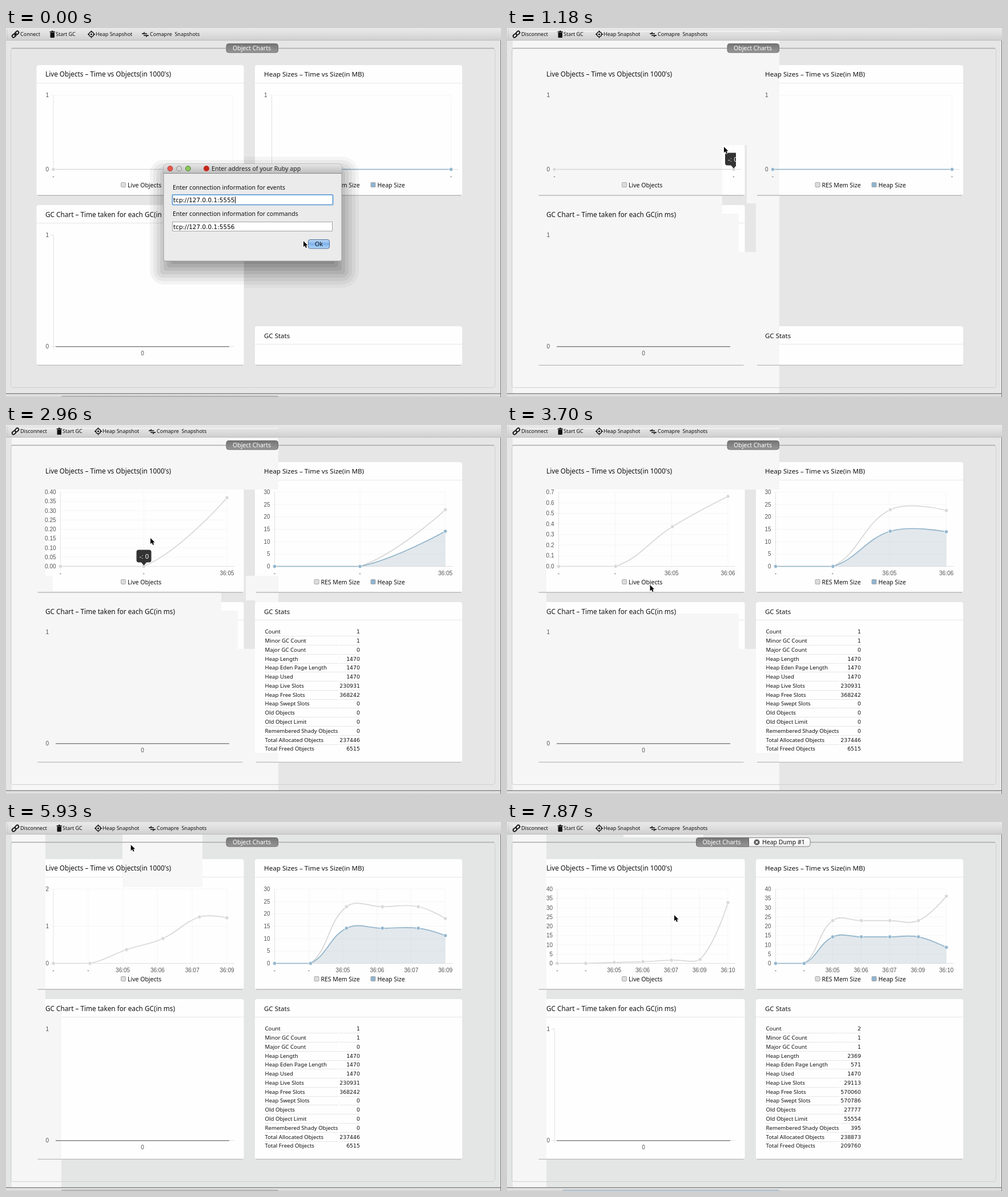
An HTML page with a canvas that plays this animation: 867x646 px, repeating every 8 s.

```html
<!DOCTYPE html>
<html lang="en">
<head>
<meta charset="utf-8">
<title>Object Charts</title>
<style>
html, body { margin: 0; width: 100%; height: 100%; overflow: hidden; background: #e6e6e6; }
canvas { display: block; }
</style>
</head>
<body>
<canvas id="stage" width="867" height="646"></canvas>
<script>
const g = document.getElementById('stage').getContext('2d');
const LOOP = 8000, BASE = 247.5, TOP = 117.5, RIGHT = 382.5;
const UI = '"Noto Sans", "Open Sans", sans-serif';
const WIDE = '"DejaVu Sans", sans-serif';
const AXIS = '"Liberation Sans", Arial, sans-serif';

// The screen refreshes in bursts: start time and number of refreshes.
const TICK = 146.6;
const BURSTS = [[0, 9], [1630, 1], [2080, 7], [3410, 3], [4450, 7], [5640, 6], [7420, 1], [7870, 1]];
const CONNECTED = 870, STATS_IN = 1630, DUMPING = 7420, DUMPED = 7870;

const CURSOR = [[0, 521, 373], [300, 541, 375], [730, 541, 375], [1170, 380, 208], [2080, 380, 208],
  [2960, 253, 198], [3700, 250, 300], [4890, 240, 16], [5640, 200, 9], [6370, 293, 163]];

// Points after the first two arrive at these times.
const ARRIVALS = [2000, 3100, 4380, 5560, 7430];
const LABELS = ['-', '-', '36:05', '36:06', '36:07', '36:09', '36:10'];
const LIVE = [0, 0, .37, .67, 1.25, 1.55, 33.4];
const RES = [0, 0, 22.9, 22.9, 22.9, 22.9, 36.9];
const HEAP = [0, 0, 14.2, 14.2, 14.2, 14.2, 8.8];

// Partial refreshes that wipe the pale wash: time, then x, y, width, height.
const WIPES = [[1020, 377, 205, 43, 120], [1020, 406, 307, 30, 85], [1630, 436, 310, 363, 264],
  [2080, 69, 113, 714, 151], [2080, 82, 264, 338, 26], [3410, 69, 113, 713, 217],
  [4450, 69, 6, 713, 257], [5640, 97, 1, 684, 645], [7870, 69, 27, 712, 619]];

const STATS = [['Count', 1, 2], ['Minor GC Count', 1, 1], ['Major GC Count', 0, 1],
  ['Heap Length', 1470, 2369], ['Heap Eden Page Length', 1470, 571], ['Heap Used', 1470, 1470],
  ['Heap Live Slots', 230931, 29113], ['Heap Free Slots', 368242, 570060],
  ['Heap Swept Slots', 0, 570786], ['Old Objects', 0, 27777], ['Old Object Limit', 0, 55554],
  ['Remembered Shady Objects', 0, 395], ['Total Allocated Objects', 237446, 238873],
  ['Total Freed Objects', 6515, 209760]];

const lerp = (a, b, p) => a + (b - a) * p;

function rect(x, y, w, h, fill) { g.fillStyle = fill; g.fillRect(x, y, w, h); }

function box(x, y, w, h, r, fill, stroke, lw = 1) {
  g.beginPath();
  g.roundRect(x, y, w, h, r);
  if (fill) { g.fillStyle = fill; g.fill(); }
  if (stroke) { g.strokeStyle = stroke; g.lineWidth = lw; g.stroke(); }
}

function dot(x, y, r, fill, stroke, lw = 1) {
  box(x - r, y - r, 2 * r, 2 * r, r, fill, stroke, lw);
}

function line(x1, y1, x2, y2, color, lw = 1) {
  g.beginPath();
  g.moveTo(x1, y1);
  g.lineTo(x2, y2);
  g.strokeStyle = color;
  g.lineWidth = lw;
  g.stroke();
}

function text(s, x, y, size, color = '#111', align = 'left', font = UI) {
  g.font = size + 'px ' + font;
  g.textAlign = align;
  g.fillStyle = color;
  g.fillText(s, x, y);
}

const tickLabel = (s, x, y, align) => text(s, x, y, 10, '#555', align, AXIS);

function shade(y, h, ...colors) {
  const s = g.createLinearGradient(0, y, 0, y + h);
  colors.forEach((c, i) => s.addColorStop(i / (colors.length - 1), c));
  return s;
}

function panel(x, y, h) {
  box(x, y, 363, h, 4, '#fefefe');
  line(x, y + 31.5, x + 363, y + 31.5, '#e6e6e6');
}

// Axis with rounded limits, halving the step while the labels still fit.
function makeAxis(data, n, dx) {
  const top = Math.max(...data.slice(0, n)) || 1;
  const order = Math.floor(Math.log10(top));
  let step = 10 ** order, count = Math.ceil(top / step - 1e-9);
  const max = count * step;
  while (count * 2 <= 8 && (order < 0 || step % 2 === 0)) { step /= 2; count *= 2; }
  const digits = step >= 1 ? 0 : (step * 10 % 1 > .01 && step < .1 ? 2 : 1);
  g.font = '10px ' + AXIS;
  const x0 = dx + 78 + .9 * g.measureText(max.toFixed(digits)).width;
  const x1 = dx + (n > 2 ? 387 : 397);
  return {
    n, x0, x1, step, count, digits,
    x: i => lerp(x0, x1, i / (n - 1)),
    y: v => lerp(BASE, TOP, v / max)
  };
}

function grid(a) {
  for (let k = 0; k <= a.count; k++) {
    const y = a.y(k * a.step);
    line(a.x0 - 5, y, k ? a.x1 : a.x1 + 13, y, k ? '#f5f5f5' : '#e0e0e0');
  }
  for (let i = 0; i < a.n; i++) line(a.x(i), TOP, a.x(i), BASE + 4, i ? '#f5f5f5' : '#e2e2e2');
}

function axisLabels(a) {
  for (let k = 0; k <= a.count; k++) {
    const v = k * a.step;
    tickLabel(v.toFixed(a.digits), a.x0 - 8, a.y(v) + 3.5, 'right');
  }
  for (let i = 0; i < a.n; i++) tickLabel(LABELS[i], a.x(i), 263, 'center');
}

// Points glide from the previous axis to the new one.
function place(t, data, now, old) {
  const p = Math.min(1, (t - ARRIVALS[now.n - 3]) / 700), ease = 1 - (1 - p) ** 4;
  return data.slice(0, now.n).map((v, i) => {
    const x = now.x(i), y = now.y(v);
    if (now.n === 2) return { x, y };
    const known = i < old.n;
    return {
      x: lerp(known ? old.x(i) : x, x, ease),
      y: lerp(known ? old.y(v) : BASE, y, ease)
    };
  });
}

function curve(pts, color, fill) {
  const clampY = y => Math.max(TOP, Math.min(BASE, y));
  const ctl = pts.map((p, i) => {
    const a = pts[i - 1], b = pts[i + 1];
    if (!a || !b) return [p, p];
    const d1 = Math.hypot(p.x - a.x, p.y - a.y), d2 = Math.hypot(b.x - p.x, b.y - p.y);
    return [-d1, d2].map(d => {
      const k = .4 * d / (d1 + d2);
      return { x: p.x + k * (b.x - a.x), y: clampY(p.y + k * (b.y - a.y)) };
    });
  });
  g.beginPath();
  g.moveTo(pts[0].x, pts[0].y);
  for (let i = 1; i < pts.length; i++) {
    const c = ctl[i - 1][1], d = ctl[i][0];
    g.bezierCurveTo(c.x, c.y, d.x, d.y, pts[i].x, pts[i].y);
  }
  g.strokeStyle = color;
  g.lineWidth = 1.7;
  g.stroke();
  if (fill) {
    g.lineTo(pts[pts.length - 1].x, BASE);
    g.lineTo(pts[0].x, BASE);
    g.fillStyle = fill;
    g.fill();
  }
  for (const p of pts) dot(p.x, p.y, 3.2, color, '#fff', .8);
}

function legend(x, label, fill) {
  box(x + .5, 270.5, 8, 8, 1, fill, '#a8a8a8');
  text(label, x + 12, 278.5, 10.5);
}

function tooltip(x, tip) {
  g.save();
  g.beginPath();
  g.rect(60, 110, 341, 150);
  g.clip();
  box(x, 218.5, 26, 22, 4, '#333');
  g.beginPath();
  g.moveTo(tip - 5, 240);
  g.lineTo(tip + 5, 240);
  g.lineTo(tip, 246);
  g.fill();
  text('-: 0', x + 5, 234, 11.5, '#fff', 'left', AXIS);
  g.restore();
}

function wash(t) {
  if (t < CONNECTED) return;
  g.save();
  for (const [at, ...hole] of WIPES) {
    if (at > t) break;
    g.beginPath();
    g.rect(0, 0, 867, 646);
    g.rect(...hole);
    g.clip('evenodd');
  }
  rect(10, 5, 467, 2, 'rgba(255,255,255,.5)');
  rect(10, 22, 467, 624, '#f6f6f6');
  g.restore();
  if (t >= 5640) rect(204, 22, 140, t < DUMPED ? 92 : 5, '#f7f7f7');
}

function toolbar(t) {
  const on = t >= CONNECTED, ink = '#111';
  g.save();
  g.translate(16.5, 11);
  g.rotate(-.75);
  box(-7, -2.5, 7, 5, 2.5, null, ink, 1.8);
  box(0, -2.5, 7, 5, 2.5, null, ink, 1.8);
  if (!on) line(-3, 0, 3, 0, ink, 1.6);
  g.restore();
  text(on ? 'Disconnect' : 'Connect', 25, 14, 9);

  g.save();
  g.translate(on ? 12 : 0, 0);
  box(77.5, 8, 7.5, 9, 1, ink);
  rect(76.5, 6, 9.5, 1.5, ink);
  rect(79.5, 4.8, 3.5, 1.5, ink);
  text('Start GC', 87, 14, 9);
  dot(149.5, 11, 4.2, null, ink, 1.6);
  dot(149.5, 11, 1.6, ink);
  for (const d of [-1, 1]) {
    line(149.5 + 4 * d, 11, 149.5 + 6.5 * d, 11, ink, 1.6);
    line(149.5, 11 + 4 * d, 149.5, 11 + 6.5 * d, ink, 1.6);
  }
  text('Heap Snapshot', 157, 14, 9);
  line(238, 10, 247, 10, ink, 1.5);
  line(241, 13, 250, 13, ink, 1.5);
  line(240, 10, 243, 7.5, ink, 1.3);
  line(245, 15.5, 248, 13, ink, 1.3);
  text('Comapre  Snapshots', 252, 14, 9);
  g.restore();
}

function tabs(t) {
  const two = t >= DUMPED, x = two ? 331.5 : 386;
  if (two) {
    box(400, 27.5, 131, 15.5, 4, shade(27, 16, '#fff', '#f1f1f1'), '#848484');
    dot(437.5, 35.5, 5, '#555');
    for (const d of [-2, 2]) line(437.5 - d, 33.5, 437.5 + d, 37.5, '#fff', 1.2);
    text('Heap Dump #1', 447, 39, 10.5);
  }
  box(x, 27.5, two ? 92 : 90.5, 15.5, two ? [4, 0, 0, 4] : 4, shade(27, 16, '#747474', '#969696'), '#6a6a6a');
  text('Object Charts', x + 11, 38.7, 10.5, '#fff');
}

function stats(t) {
  const col = t >= DUMPED ? 2 : 1;
  STATS.forEach((row, i) => {
    const y = 365.3 + i * 15.77;
    text(row[0], 453.5, y, 9.65);
    text(row[col], 620, y, 9.4, '#111', 'right', WIDE);
    if (i === STATS.length - 1) return;
    const sep = Math.round(y + 4) + .5;
    line(453, sep, 582, sep, '#e6e6e6');
    line(584, sep, 620, sep, '#e6e6e6');
  });
}

function dialog(pressed) {
  for (let i = 0; i < 9; i++) {
    const r = 30 - 6 * i, left = i ? 276 - r : 417;
    box(left, 255 - r, 588 + r - left, 170 + 2 * r, i ? Math.max(5, r) : [0, 30, 30, 0],
      `rgba(0,0,0,${.035 + .008 * i})`);
  }
  box(276, 238, 312, 170, [5, 5, 3, 3], '#ebebeb', '#9a9a9a');
  box(276, 238, 312, 17, [5, 5, 0, 0], shade(238, 17, '#e6e6e6', '#bcbcbc'));
  line(276, 254.5, 588, 254.5, '#8a8a8a');
  [['#e8564c', '#a33'], ['#d5d5d5', '#888'], ['#8cc95c', '#4b7d2c']].forEach(([fill, rim], i) =>
    dot(287.5 + 15.7 * i, 246, 4.4, fill, rim));
  dot(351, 246, 5, '#c5281c');
  text('Enter address of your Ruby app', 360, 250, 10.6, '#222');

  text('Enter connection information for events', 292, 282.5, 10.5);
  box(291.5, 292, 281, 17.5, 1, '#fff', '#74aadb', 2.2);
  text('tcp://127.0.0.1:5555', 293, 305, 10.5, '#000', 'left', WIDE);
  rect(401, 295, 1, 12, '#000');
  text('Enter connection information for commands', 292, 329, 10.5);
  box(291.5, 339.5, 280, 16, 0, '#fff', '#a2a2a2');
  text('tcp://127.0.0.1:5556', 293, 352, 10.5, '#000', 'left', WIDE);

  const blue = pressed ? ['#8cb8e6', '#4c8cd8', '#7fb9ee'] : ['#c9e0f6', '#7db0ea', '#b3dcfa'];
  box(529.5, 370.5, 37, 15.5, 3, shade(370, 16, ...blue), '#4f6c9c');
  text('Ok', 548, 382, 10.5, '#111', 'center');
}

function cursor(t) {
  const i = CURSOR.findLastIndex(k => k[0] <= t);
  const a = CURSOR[i], b = CURSOR[i + 1] || a;
  const p = b === a ? 0 : (t - a[0]) / (b[0] - a[0]);
  g.save();
  g.translate(lerp(a[1], b[1], p), lerp(a[2], b[2], p));
  g.scale(.9, .9);
  const shape = new Path2D('M0 0V11.5L2.7 9L4.6 13.2L6.6 12.3L4.8 8.2H8.3Z');
  g.strokeStyle = '#fff';
  g.lineWidth = 1.6;
  g.stroke(shape);
  g.fillStyle = '#000';
  g.fill(shape);
  g.restore();
}

function windowFrame(t) {
  box(8.5, 35.5, 848, 594, 4, null, '#cfcfcf');
  line(10, 35.5, 855, 35.5, '#a9a9a9', 1.5);
  for (const x of [53.5, 436])
    for (const y of [293, 590.3]) line(x + 2, y, x + 361, y, '#b8b8b8', 1.3);
  rect(0, 639.5, 867, 1.5, '#858585');
  rect(0, 641, 867, 5, shade(641, 5, '#ececec', '#d2d2d2'));
  if (t < CONNECTED || t >= 5640) {
    const done = t >= DUMPED;
    box(97.5, 644.5, 379, 6, 2, done ? '#d8e8f0' : '#d4d4d4', done ? '#7f9caf' : '#8d8d8d');
    if (t >= DUMPING && !done) rect(105, 644, 32, 2, '#a9c6d8');
  }
  rect(866, 22, 1, 624, '#777');
}

function draw(t) {
  const full = t >= STATS_IN, statsTop = full ? 310 : 522;
  const n = 2 + ARRIVALS.filter(a => a <= t).length;
  const left = makeAxis(LIVE, n, 0), right = makeAxis(RES, n, RIGHT);
  const oldLeft = makeAxis(LIVE, n - 1, 0), oldRight = makeAxis(RES, n - 1, RIGHT);

  rect(0, 0, 867, 646, t < 4450 ? '#e6e6e6' : '#e4e5e5');
  rect(0, 0, 867, 22, shade(0, 22, '#e9e9e9', '#dedede', '#cecece'));
  line(0, 21.5, 867, 21.5, '#bdbdbd');
  for (let y = 3; y < 20; y += 3) rect(2, y, 1, 1, '#aaa');
  panel(53.5, 65, 228);
  panel(436, 65, 228);
  panel(53.5, 310, 280);
  panel(436, statsTop, 590 - statsTop);
  grid(left);
  grid(right);
  line(83.5, 362, 83.5, 562, '#e2e2e2');
  line(78, 362.5, 84, 362.5, '#e2e2e2');
  line(78, 557.5, 400, 557.5, '#e2e2e2');
  wash(t);
  windowFrame(t);
  toolbar(t);
  tabs(t);

  text('Live Objects – Time vs Objects(in 1000\'s)', 69, 85, 11.75);
  text('Heap Sizes – Time vs Size(in MB)', 452, 85, 11.65);
  text('GC Chart – Time taken for each GC(in ms)', 69, 330.5, 11.75);
  text('GC Stats', 452, statsTop + 20.5, 11.5);
  if (full) stats(t);

  axisLabels(left);
  axisLabels(right);
  curve(place(t, LIVE, left, oldLeft), '#d8d8d8');
  curve(place(t, RES, right, oldRight), '#d8d8d8');
  curve(place(t, HEAP, right, oldRight), '#92b6cd', 'rgba(140,165,178,.24)');
  legend(201, 'Live Objects', '#dcdcdc');
  legend(539.5, 'RES Mem Size', '#dcdcdc');
  legend(638.5, 'Heap Size', '#8fb4d0');
  tickLabel('1', 75, 366, 'right');
  tickLabel('0', 75, 561, 'right');
  tickLabel('0', 239, 573, 'center');
  line(87, 557.7, 391, 557.7, '#838383', 1.6);

  if (t >= 1170 && t < 2080) tooltip(382, 397);
  if (t >= 2500 && t < 3410) tooltip(228.5, 241.5);
  if (t < 430) dialog(t >= 290);
  cursor(t);
}

function tick() {
  const t = performance.now() % LOOP;
  const [start, count] = BURSTS.findLast(b => b[0] <= t);
  draw(start + TICK * Math.min(count - 1, Math.floor((t - start) / TICK)));
  requestAnimationFrame(tick);
}
tick();
</script>
</body>
</html>
```
